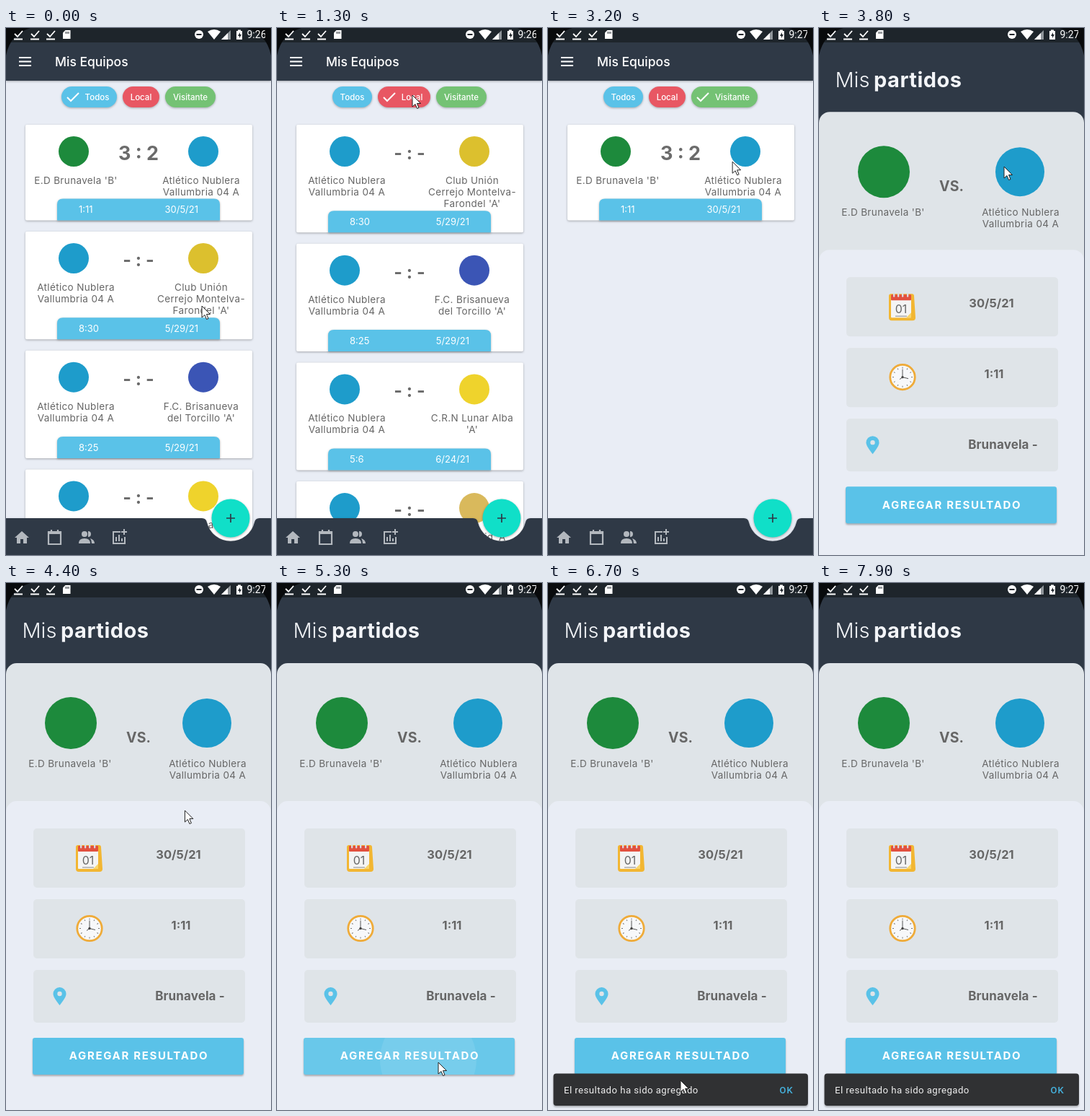
An HTML page that plays this animation: 368 by 730 pixels, repeating every 8000 ms.

```html
<!DOCTYPE html>
<html lang="es">
<head>
<meta charset="utf-8">
<title>Mis Equipos</title>
<style>
html, body { margin: 0; width: 100%; height: 100%; overflow: hidden; background: #e9edf5; }
svg { display: block; width: 100vw; height: 100vh; font-family: Inter, "Open Sans", sans-serif; }
.shadow { filter: drop-shadow(0 1px 1.5px rgba(0, 0, 0, .3)); }
.lift { filter: drop-shadow(0 2px 1px rgba(0, 0, 0, .28)); }
.roboto { font-family: Roboto, sans-serif; }
</style>
</head>
<body>
<svg id="stage" viewBox="0 0 368 730"></svg>
<script>
const DARK = '#2f3946', SKY = '#5ac2e8', PALE = '#e9edf5', MIST = '#dfe4e8', GREY = '#666';
const LOOP = 8000;

// Drawing helpers
const rect = (x, y, w, h, fill, r = 0, extra = '') =>
  `<rect x="${x}" y="${y}" width="${w}" height="${h}" rx="${r}" fill="${fill}" ${extra}/>`;
const circle = (x, y, r, fill, extra = '') => `<circle cx="${x}" cy="${y}" r="${r}" fill="${fill}" ${extra}/>`;
const path = (d, fill, extra = '') => `<path d="${d}" fill="${fill}" ${extra}/>`;
const line = (d, color, w, extra = '') => path(d, 'none', `stroke="${color}" stroke-width="${w}" ${extra}`);
const group = (id, body, extra = '') => `<g id="${id}" ${extra}>${body}</g>`;
const at = (x, y, body) => `<g transform="translate(${x} ${y})">${body}</g>`;
// y is the middle of the capitals
const text = (s, x, y, size, fill, { weight = 400, anchor = 'middle', gap = 0, cls = '' } = {}) =>
  `<text x="${x}" y="${y + size * .36}" font-size="${size}" fill="${fill}" font-weight="${weight}"
    text-anchor="${anchor}" letter-spacing="${gap}" class="${cls}">${s}</text>`;
const lines = (list, x, y) =>
  list.map((s, i) => text(s, x, y + i * 16.2, 13.5, GREY, { gap: .35 })).join('');
const title = (a, b, x, y, anchor) =>
  text(`${a} <tspan dx="-2.5" font-weight="700" letter-spacing=".5">${b}</tspan>`, x, y, 29, '#f3f5f8', { weight: 300, anchor });

// Teams
const home = { name: ['Atlético Nublera', 'Vallumbria 04 A'], color: '#1e9ccb' };
const green = { name: ["E.D Brunavela 'B'"], color: '#1d8a3c' };
const yellow = { name: ['Club Unión', 'Cerrejo Montelva-', "Farondel 'A'"], color: '#dcc02e' };
const navy = { name: ['F.C. Brisanueva', "del Torcillo 'A'"], color: '#3b55b5' };
const lemon = { name: ['C.R.N Lunar Alba', "'A'"], color: '#efd32c' };
const gold = { name: ["Rocalunarid 'A'"], color: '#d9b95c' };

const match = (a, b, time, date, score) => ({ a, b, time, date, score });
const away = match(green, home, '1:11', '30/5/21', '3 : 2');
const locals = [
  match(home, yellow, '8:30', '5/29/21'),
  match(home, navy, '8:25', '5/29/21'),
  match(home, lemon, '5:6', '6/24/21'),
  match(home, gold, '7:15', '6/26/21')
];

function card({ a, b, time, date, score }, y) {
  const h = score ? 132.5 : 149.2, foot = h - 30;
  return at(0, y,
    rect(27, 0, 315, h, '#fff', 2, 'class="shadow"') +
    circle(94, 37, 21, a.color) + circle(274, 37, 21, b.color) +
    text(score || '- : -', 184, 39, score ? 27 : 25, '#6b6b6b', { weight: 700 }) +
    lines(a.name, 97, 77) + lines(b.name, 271, 77) +
    path(`M71 ${h}V${foot + 8}q0-8 8-8H289q8 0 8 8V${h}Z`, SKY, 'class="shadow"') +
    text(time, 101, foot + 15, 13, '#fff', { anchor: 'start' }) +
    text(date, 267, foot + 15, 13, '#fff', { anchor: 'end' }));
}

function chips(selected) {
  let x = 77;
  return [['Todos', 55, SKY], ['Local', 51, '#e85763'], ['Visitante', 70, '#74c274']].map(([label, w, color], i) => {
    const on = i === selected, full = w + (on ? 22 : 0), left = x;
    x += full + 8;
    return rect(left, 81, full, 29, color, 14.5, 'class="shadow"') +
      (on ? line(`M${left + 8} 96l5 5 11-11`, '#fff', 2) : '') +
      text(label, left + full - w / 2, 95.5, 11.5, '#fff', { weight: 500 });
  }).join('');
}

function list(id, selected, matches) {
  let y = 134;
  const cards = matches.map(m => {
    const top = y;
    y += (m.score ? 132.5 : 149.2) + 15.5;
    return card(m, top);
  });
  return group(id, chips(selected) + cards.join(''));
}

function navBar() {
  const ink = '#b3b8be';
  return path('M0 679H272Q278 679 279 685A34 34 0 0 0 345 685Q346 679 352 679H368V730H0Z', DARK, 'class="shadow"') +
    path('M12 706L22 697l10 9h-3v8h-5v-6h-4v6h-5v-8Z', ink) +
    line('M59 698h17v17H59ZM59 700h17M63 695v4M72 695v4', ink, 2.2) +
    circle(109, 701, 4, ink) + path('M101 714q0-7 8-7t8 7Z', ink) +
    path('M114 697a4 4 0 0 1 0 8ZM117 707q6 2 6 7h-4q0-4-2-7Z', ink) +
    line('M159 698h-10v16h16v-9M153 711v-6M157 711v-9M161 711v-4M164 694v8M160 698h8', ink, 2) +
    circle(312, 679, 26.5, '#10dfc8', 'class="shadow"') +
    line('M312 673v12M306 679h12', DARK, 1.7);
}

function statusBar() {
  const bar = '#1e252b';
  const tick = x => line(`M${x - 5} 8l4 4 7-8M${x - 6} 15.5h12`, '#fff', 1.8);
  return rect(0, 0, 368, 20, bar) +
    path('M0 0H34Q6 8 0 38ZM368 0H334Q362 8 368 38Z', '#080a0c') +
    tick(17) + tick(40) + tick(62) + path('M82.500 3H89.500V15H79V6.500Z', '#fff') +
    line('M83 5v3M85 5v3M87 5v3', bar, .9) +
    circle(268, 9, 6, '#fff') + rect(264.5, 8, 7, 2, bar) +
    path('M280 5q9-6 18 0L289 16Z', '#fff') +
    path('M312 3V16H299Z', '#8f959a') + path('M308 7V16H299Z', '#fff') +
    path('M320 4h2V2.500h4V4h2V16h-8Z', '#fff') + path('M325 6l-3 5h2v3l3-5h-2Z', bar) +
    `<clipPath id="clockClip">${rect(330, 0, 30, 20, '#fff')}</clipPath>` +
    `<g clip-path="url(#clockClip)">${text('9:26', 334.5, 9, 14, '#fff', { anchor: 'start', cls: 'roboto' })
      .replace('<text', '<text id="clock"')}</g>`;
}

const button = (x, y, w, h, color, label, size) =>
  rect(x, y, w, h, color, 3, 'class="lift"') +
  text(label, x + w / 2 + 1, y + h / 2 - .5, size, '#fff', { weight: 700, gap: 1.65 });
// A pressed button lightens as a whole while a circle spreads over it
const ripple = (id, x, y, w, h, cx, cy) =>
  `<clipPath id="${id}Clip">${rect(x, y, w, h, '#fff', 3)}</clipPath>` +
  group(id, rect(x, y, w, h, '#fff', 3, 'fill-opacity=".09"') + circle(cx, cy, 0, '#fff', 'fill-opacity=".09"'),
    `clip-path="url(#${id}Clip)"`);

function calendar() {
  return path('M97 366q0-3 3-3h29q3 0 3 3l2 30q0 4-4 4H101q-4 0-4-4Z', '#f2b632') +
    rect(100, 366, 28, 30, '#f4f4f4', 1) + path('M121 396h7v-7Z', '#f8d56c') +
    rect(100, 364, 28, 8, '#e2503f', 1) +
    [103, 109, 115, 122].map(x => rect(x, 361.5, 2.3, 6, '#d9dde2', 1)).join('') +
    text('01', 114, 384, 16, '#666') + line('M106 394h16', '#888', 1);
}
function clockFace() {
  let marks = '';
  for (let i = 0; i < 12; i++) marks += line('M0-14v2', '#777', 1, `transform="rotate(${i * 30})"`);
  return at(116, 478.5, circle(0, 0, 17.2, '#f7f8fa', 'stroke="#efab39" stroke-width="2.8"') + marks +
    line('M0-11V0L8 2M0 0L-4 3', '#555', 1) + circle(0, 0, 1.7, '#444'));
}

function detail() {
  const bold = { weight: 700 };
  return rect(0, 20, 368, 760, DARK) + title('Mis', 'partidos', 22.5, 66, 'start') +
    rect(0, 111, 368, 220, MIST, 15) + rect(0, 302, 368, 480, PALE, 15) +
    circle(90, 194, 36, green.color) + circle(279, 194, 34, home.color) +
    text('VS.', 184, 213.5, 19.5, GREY, bold) +
    lines(green.name, 89, 250) + lines(home.name, 280, 250) +
    rect(38, 340, 294, 82, MIST, 5) + rect(38, 438, 294, 82, MIST, 5) + rect(38, 536, 294, 73, MIST, 5) +
    calendar() + clockFace() +
    path('M74.500 585C68.500 577 65.500 573 65.500 569a9 9 0 0 1 18 0c0 4-3 8-9 16Z', SKY) + circle(74.5, 569, 3.2, MIST) +
    text('30/5/21', 239.5, 376, 16.5, GREY, bold) + text('1:11', 243, 474, 16.5, GREY, bold) +
    text('Brunavela -', 255.5, 571.5, 17, GREY, { weight: 700, gap: .1 }) +
    button(37, 630, 293, 51, SKY, 'AGREGAR RESULTADO', 15) + ripple('addRipple', 37, 630, 293, 51, 210, 660);
}

function dialog() {
  const side = (x, team, names, score, underline) =>
    rect(x, 207, 146.5, 338, '#e0e5e9', 8) + circle(x + 73, 271, 37, team.color) +
    lines(names, x + 73, 338) +
    text(score, x + 73, 465, 58, '#1a1e24', { weight: 800 }) + rect(x + 26, 514, 94, 2, underline);
  return rect(0, 20, 368, 760, DARK) + title('Ingresar', 'resultado', 184, 147, 'middle') +
    side(30, green, ['E.D Brunavela', "'B'"], 3, '#25d9c6') +
    side(192, home, ['Atlético', 'Nublera', 'Vallumbria 04', 'A'], 2, '#a3a8ad') +
    button(30, 588, 146, 34, '#364b70', 'CANCELAR', 12.8) +
    button(192, 588, 146.5, 34, SKY, 'ACEPTAR', 12.8) + ripple('okRipple', 192, 588, 146.5, 34, 269, 612);
}

stage.innerHTML =
  rect(0, 0, 368, 730, PALE) +
  group('home',
    list('all', 0, [away, ...locals.slice(0, 3)]) + list('local', 1, locals) + list('visitor', 2, [away]) +
    rect(0, 20, 368, 53, DARK, 0, 'class="shadow"') +
    line('M18 41h17M18 46.500h17M18 52h17', '#fff', 2) +
    text('Mis Equipos', 68, 47, 17.5, '#fff', { weight: 500, anchor: 'start' }) + navBar()) +
  group('detail', detail()) + group('dialog', dialog()) +
  group('snack', rect(7.5, 679.5, 353.5, 44.5, '#303133', 4, 'class="lift"') +
    text('El resultado ha sido agregado', 22, 702, 13.2, '#eee', { anchor: 'start', cls: 'roboto', gap: .45 }) +
    text('OK', 331, 702, 13, '#45b2de', { weight: 500, cls: 'roboto', gap: .8 })) +
  group('status', statusBar()) +
  group('cursor', path('M0 0V16L4 12.500 6.500 18.500 9 17.500 6.500 11.500H11.500Z', '#fff', 'stroke="#222"'));

// Motion
const $ = id => document.getElementById(id);
const part = (t, from, ms) => Math.min(1, Math.max(0, (t - from) / ms));
const easeOut = p => 1 - (1 - p) ** 4.3;
const smooth = p => p * p * (3 - 2 * p);
const show = (id, on) => $(id).style.display = on ? '' : 'none';

// time, x, y of the pointer tip
const route = [
  [0, 272, 385], [300, 272, 385], [1050, 188, 93], [1650, 188, 93], [2050, 245, 99], [2700, 245, 99],
  [3300, 257, 192], [4100, 257, 192], [5000, 224, 664], [5450, 224, 664], [5800, 269, 623],
  [6250, 269, 623], [6650, 184, 689], [8000, 184, 689]
];
function pointer(t) {
  const i = route.findIndex(k => k[0] > t), [t0, x0, y0] = route[i - 1], [t1, x1, y1] = route[i];
  const p = smooth(part(t, t0, t1 - t0));
  return [x0 + (x1 - x0) * p, y0 + (y1 - y0) * p];
}

// Pages rise 40px while fading in
function page(id, amount) {
  show(id, amount > 0);
  $(id).setAttribute('transform', `translate(0 ${40 * (1 - amount)})`);
  $(id).setAttribute('opacity', Math.min(1, amount * 1.16));
}
function wave(id, t, start) {
  const p = part(t, start, 240);
  show(id, p > 0);
  $(id).lastChild.setAttribute('r', 145 * p);
  $(id).setAttribute('opacity', 1 - part(t, start + 240, 150));
}

function draw(t) {
  show('all', t < 1300);
  show('local', t >= 1300 && t < 2400);
  show('visitor', t >= 2400);
  $('clock').textContent = t < 1400 ? '9:26' : '9:27';
  page('detail', easeOut(part(t, 3695, 280)));
  page('dialog', easeOut(part(t, 5390, 280)) * (1 - part(t, 6250, 200)));
  wave('addRipple', t, 5190);
  wave('okRipple', t, 6060);
  const up = easeOut(part(t, 6420, 250));
  show('snack', up > 0);
  $('snack').setAttribute('transform', `translate(0 ${52 * (1 - up)})`);
  show('cursor', t < 7100);
  $('cursor').setAttribute('transform', `translate(${pointer(t)})`);
}
(function tick() {
  draw(performance.now() % LOOP);
  requestAnimationFrame(tick);
})();
</script>
</body>
</html>
```
